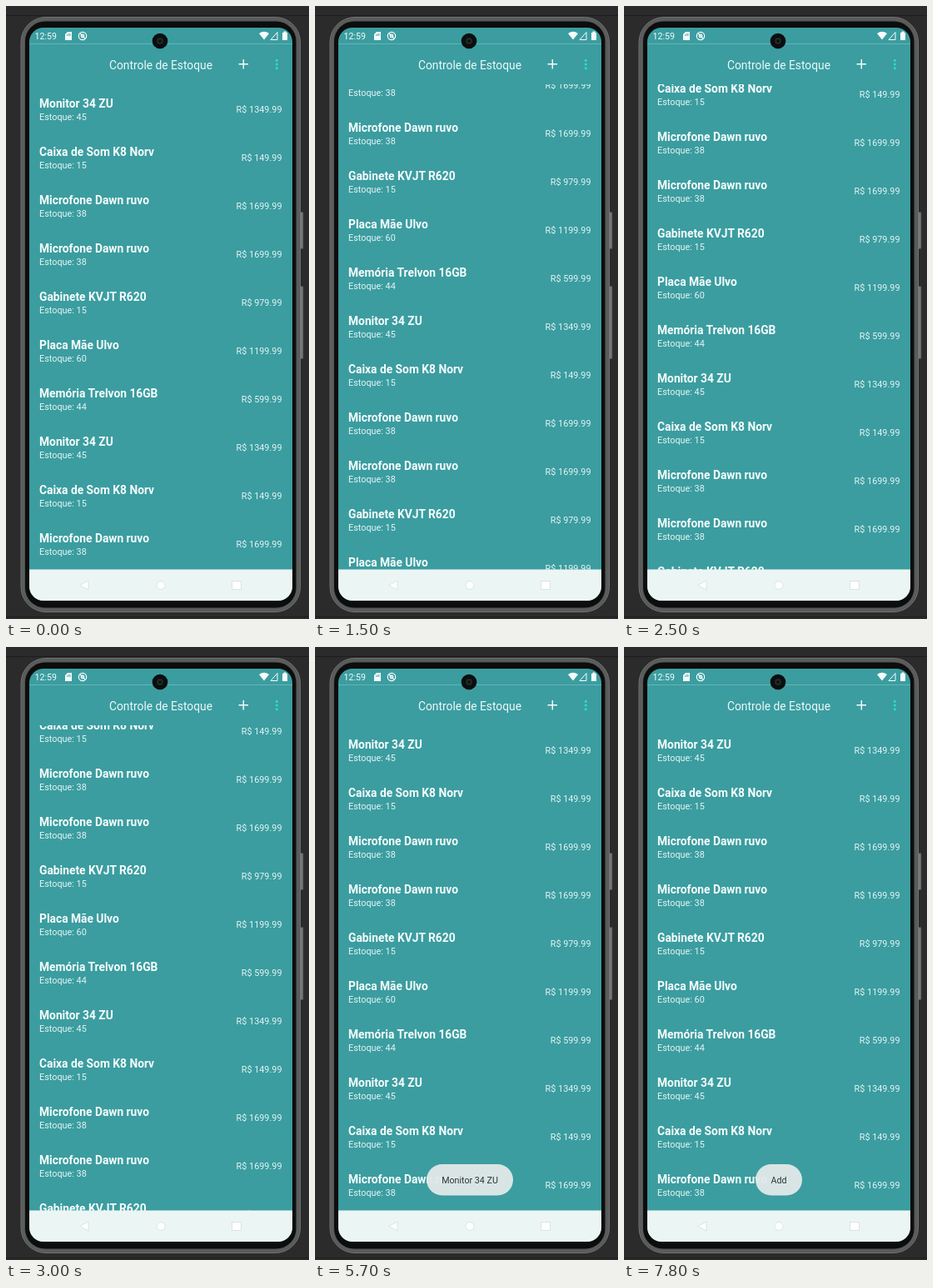
These frames come from a looping animation (364 by 736 pixels, 8 s). An HTML page:

```html
<!DOCTYPE html>
<html lang="pt">
<head>
<meta charset="utf-8">
<title>Controle de Estoque</title>
<style>
  html, body { margin: 0; width: 100%; height: 100%; overflow: hidden; background: #2b2b2b; }
  svg { display: block; width: 364px; height: 736px; font-family: Roboto, sans-serif; }
  .name { font-size: 13.8px; font-weight: 700; fill: #f6fcfc; }
  .small { font-size: 10.85px; fill: #e6f4f4; }
  .price { text-anchor: end; }
  .toast text { font-size: 10.7px; fill: #2c3333; text-anchor: middle; }
</style>
</head>
<body>
<svg viewBox="0 0 364 736">
  <defs>
    <clipPath id="screen"><rect x="28" y="26" width="316" height="688" rx="17"/></clipPath>
    <clipPath id="viewport"><rect x="28" y="94" width="316" height="583"/></clipPath>
  </defs>
  <rect width="364" height="736" fill="#2b2b2b"/>
  <path d="M0 11.5H364M0 733.5H364" stroke="#1d1d1d"/>

  <!-- phone body -->
  <g fill="#777878" stroke="#4a4b4b" stroke-width=".8">
    <rect x="352.5" y="247.5" width="4.5" height="44" rx="1"/>
    <rect x="352.5" y="336.5" width="4.5" height="87" rx="1"/>
  </g>
  <rect x="18" y="13.5" width="335.5" height="714" rx="30" fill="#555656" stroke="#747575"/>
  <rect x="20.5" y="16" width="330.5" height="709" rx="27.5" fill="none" stroke="#646565"/>
  <rect x="23" y="18.5" width="325.5" height="704" rx="24" fill="#0c0d0d"/>

  <g clip-path="url(#screen)">
    <rect x="28" y="26" width="316" height="688" fill="#3b9da0"/>
    <g clip-path="url(#viewport)">
      <ellipse id="glow" cx="205" cy="700" rx="190" ry="62" fill="#4588b0"/>
      <g id="list"></g>
    </g>

    <!-- status bar -->
    <path d="M28 45.5H344" stroke="#66b4b6"/>
    <text x="34.5" y="40" font-size="10.6" fill="#f6fcfc">12:59</text>
    <g fill="#f6fcfc">
      <path d="M74 31H79V41H71V34Z"/>
      <path d="M304 33Q310 28.5 316 33L310 40.5Z"/>
      <path d="M332 32H333.5V30.5H336.5V32H338V41H332Z"/>
    </g>
    <path d="M73.5 34V36M75.3 33V36M77 33V36" stroke="#3b9da0" stroke-width=".8"/>
    <path d="M318 40.5H326V31.5Z" fill="none" stroke="#f6fcfc"/>
    <g fill="none" stroke="#f6fcfc" stroke-width="1.2">
      <circle cx="92" cy="36" r="4.7"/>
      <circle cx="92" cy="36" r="1.8"/>
      <path d="M89 33L95 39"/>
    </g>
    <circle cx="185" cy="42" r="9.3" fill="#0b0e0e"/>
    <circle cx="185" cy="42" r="4" fill="#202728"/>
    <circle cx="185" cy="42" r="1.5" fill="#090b0b"/>

    <!-- app bar -->
    <text x="124" y="75.5" font-size="13.8" fill="#edf8f8">Controle de Estoque</text>
    <path d="M279.5 69.8H291M285.3 64V75.5" stroke="#f6fcfc" stroke-width="1.5"/>
    <g fill="#27e0cd">
      <circle cx="325.3" cy="65.3" r="1.5"/>
      <circle cx="325.3" cy="70" r="1.5"/>
      <circle cx="325.3" cy="74.7" r="1.5"/>
    </g>

    <!-- navigation bar -->
    <rect x="28" y="676.5" width="316" height="38" fill="#ebf5f4"/>
    <g fill="#fff" stroke="#d3dfde" stroke-width=".8">
      <path d="M99 690V701L88.5 695.5Z"/>
      <circle cx="186" cy="695.5" r="5"/>
      <rect x="271.5" y="690.5" width="11" height="10"/>
    </g>
  </g>
  <g id="itemToast" class="toast">
    <rect x="134" y="621" width="104" height="37.5" rx="18.7" fill="#e2e9e9" fill-opacity=".95"/>
    <text x="186" y="643.5">Monitor 34 ZU</text>
  </g>
  <g id="addToast" class="toast">
    <rect x="158" y="621" width="56" height="37.5" rx="18.7" fill="#e2e9e9" fill-opacity=".95"/>
    <text x="186" y="643.5">Add</text>
  </g>
</svg>
<script>
const LOOP = 8000, STEP = 100, PITCH = 58, END = 229;
const products = [
  ['Monitor 34 ZU', 45, '1349.99'],
  ['Caixa de Som K8 Norv', 15, '149.99'],
  ['Microfone Dawn ruvo', 38, '1699.99'],
  ['Microfone Dawn ruvo', 38, '1699.99'],
  ['Gabinete KVJT R620', 15, '979.99'],
  ['Placa Mãe Ulvo', 60, '1199.99'],
  ['Memória Trelvon 16GB', 44, '599.99']
];
// [start, end, direction]
const swipes = [[900, 1915, 1], [2200, 2689, -1], [2800, 3300, 1], [3450, 3950, -1]];

const $ = id => document.getElementById(id);
const progress = (t, from, to) => Math.min(1, Math.max(0, (t - from) / (to - from)));
const smooth = p => p * p * (3 - 2 * p);
const easeOut = p => 1 - (1 - p) ** 2;

$('list').innerHTML = [...products, ...products].map(([name, stock, price], i) => `
  <g transform="translate(0 ${i * PITCH})">
    <text class="name" x="40" y="121.6">${name}</text>
    <text class="small" x="40" y="136.9">Estoque: ${stock}</text>
    <text class="small price" x="331.5" y="127.8">R$ ${price}</text>
  </g>`).join('');

function scrollAt(t) {
  return swipes.reduce((y, [from, to, dir]) => y + dir * END * smooth(progress(t, from, to)), 0);
}

function draw(t) {
  $('list').setAttribute('transform', `translate(0 ${-Math.round(scrollAt(t))})`);
  $('glow').setAttribute('opacity', 0.45 * progress(t, 1900, 2100) * (1 - progress(t, 2200, 2400)));
  $('itemToast').setAttribute('opacity',
    easeOut(progress(t, 4100, 4600)) * (1 - progress(t, 6000, 6600) ** 2));
  $('addToast').setAttribute('opacity', easeOut(progress(t, 7300, 7800)));
}

function tick(now) {
  draw(Math.floor(now % LOOP / STEP) * STEP);
  requestAnimationFrame(tick);
}
draw(0);
requestAnimationFrame(tick);
</script>
</body>
</html>
```
